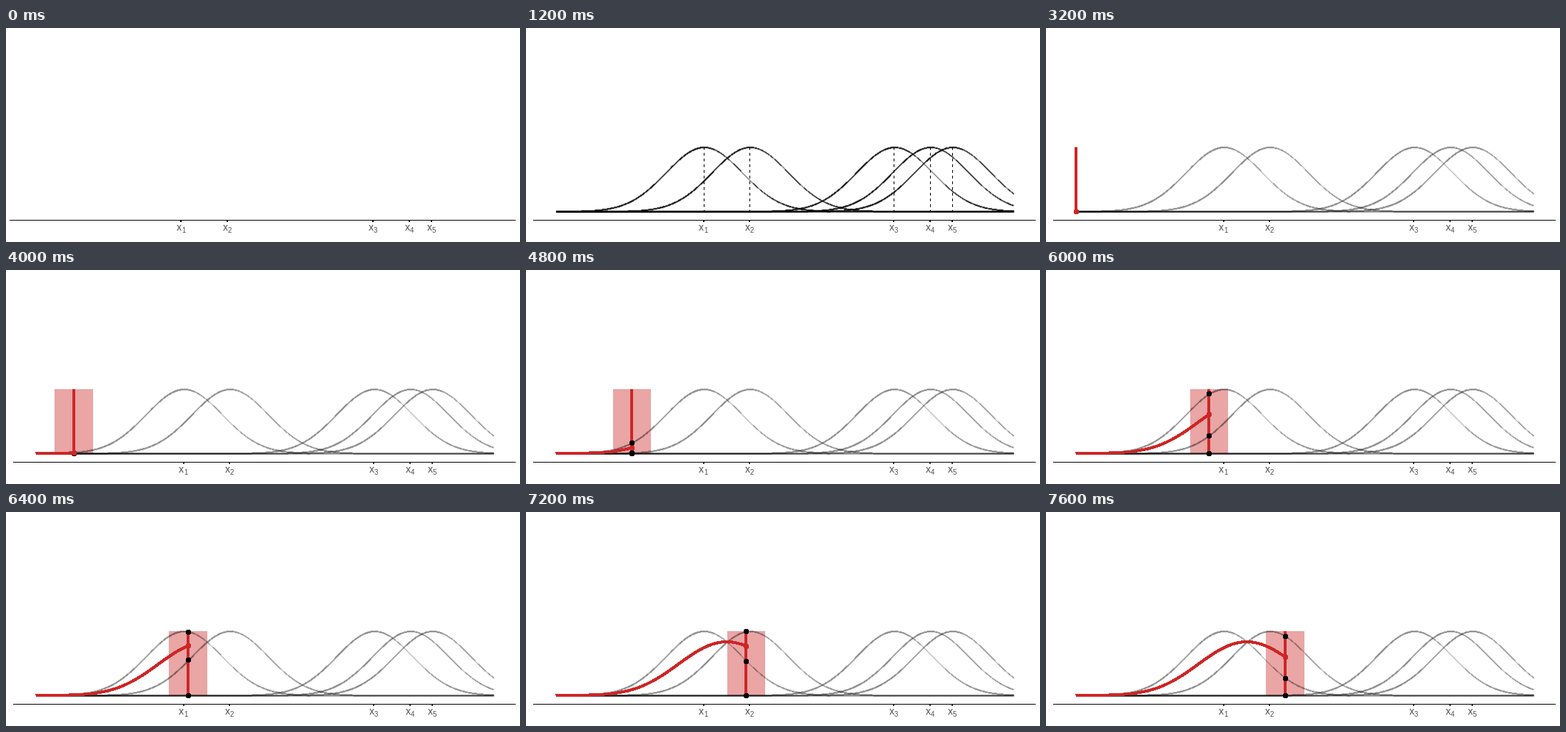
A matplotlib script for the animation above (8 s loop, 720x300 px).

```python
import numpy as np
import matplotlib.pyplot as plt
from matplotlib.animation import FuncAnimation
from matplotlib.patches import Circle, Rectangle

W, H, DPI = 720, 300, 100
PX = 72 / DPI                      # points per pixel
RED, TINT, GREY = "#CD2626", "#EAA5A5", "#4D4D4D"
MEANS = [3.882, 5.09, 8.885, 9.832, 10.41]
SPAN = 12                          # data range, kernel width is 1
BASE, PEAK = 257, 167
STEP_MS = 400
FRAMES = 20
CURVES_AT, SWEEP_AT = 3, 8         # first step of each stage
STEP = 0.5                         # sweep advance per step

plt.rcParams["path.simplify"] = False
fig = plt.figure(figsize=(W / DPI, H / DPI), dpi=DPI, facecolor="white")
ax = fig.add_axes([0, 0, 1, 1])


def to_x(v, left=10, right=714):
    """Data value to pixels, with a 5% margin on both sides."""
    pad = (right - left) / 22
    return left + pad + np.asarray(v) * (right - left - 2 * pad) / SPAN


def to_y(h):
    return BASE - h * (BASE - PEAK)


def kernel(x, m):
    return np.exp(-(x - m) ** 2 / 2)


def total(x):
    return sum(kernel(x, m) for m in MEANS) / 2


def box(x0, y0, x1, y1, color, z=1):
    ax.add_patch(Rectangle((x0, y0), x1 - x0, y1 - y0, fc=color, lw=0,
                           zorder=z))


def dot(x, h, color, z):
    center = (np.floor(x) + 0.5, np.round(to_y(h)) + 0.5)
    ax.add_patch(Circle(center, 3.2, fc=color, lw=0, aa=False, zorder=z))


def draw_axis(left, tick_color):
    box(left, 269, 714, 270, "black", 3)
    for i, m in enumerate(MEANS, 1):
        x = float(to_x(m, left))
        tick = np.floor(x)
        box(tick - 1, 269, tick + 1, 272, tick_color, 2)
        for dx, y, text, size in ((-6.8, 284, "x", 14), (0.2, 287, str(i), 9.8)):
            ax.text(x + dx, y, text, fontsize=size * PX, color=GREY,
                    family="Liberation Sans", va="baseline")


def draw_kernels(alpha):
    """Pixel-stepped curves with a slightly slanted two pixel pen."""
    start, end = to_x([0, SPAN])
    cols = np.arange(start, end + 2)
    unit = (end - start) / SPAN
    for m in MEANS:
        low, high = (np.round(to_y(kernel((cols + d - start) / unit, m)))
                     for d in (0, 0.5))
        ax.fill_between(cols, high - 1, low + 1, step="post", color="black",
                        lw=0, alpha=alpha, zorder=4)


def draw_guides():
    for m in MEANS:
        x = np.floor(to_x(m))
        for y in range(PEAK, BASE, 8):
            box(x, y, x + 1, min(y + 4, BASE), "black", 3)


def draw_sweep(pos):
    x = float(to_x(pos))
    mid = np.floor(x)
    if pos > 0:
        lo, hi = np.floor(to_x([pos - STEP, pos + STEP]) + 1e-6)
        box(lo, PEAK, hi, BASE, TINT, 1)
        path = np.linspace(0, pos, int(pos * 27) + 2)
        # Unsmoothed strokes fill every touched pixel, so 3 covers 4 rows.
        ax.plot(to_x(path), to_y(total(path)), color=RED, lw=3 * PX, aa=False,
                zorder=6, solid_capstyle="butt", solid_joinstyle="round")
    box(mid - 2, PEAK, mid + 2, BASE, RED, 5)
    for m in MEANS:
        dot(x, kernel(pos, m), "black", 7)
    dot(x, total(pos), RED, 8)


def draw(n):
    ax.clear()
    ax.set_xlim(0, W)
    ax.set_ylim(H, 0)
    ax.axis("off")
    if n < CURVES_AT:
        draw_axis(5, "black")
    elif n < SWEEP_AT:
        draw_axis(10, "black")
        draw_kernels(1)
        draw_guides()
    else:
        draw_axis(10, "#333333")
        draw_kernels(0.5)
        draw_sweep((n - SWEEP_AT) * STEP)
    return []


anim = FuncAnimation(fig, draw, frames=FRAMES, interval=STEP_MS,
                     init_func=lambda: draw(0), repeat=True, repeat_delay=0)
plt.show()
```
